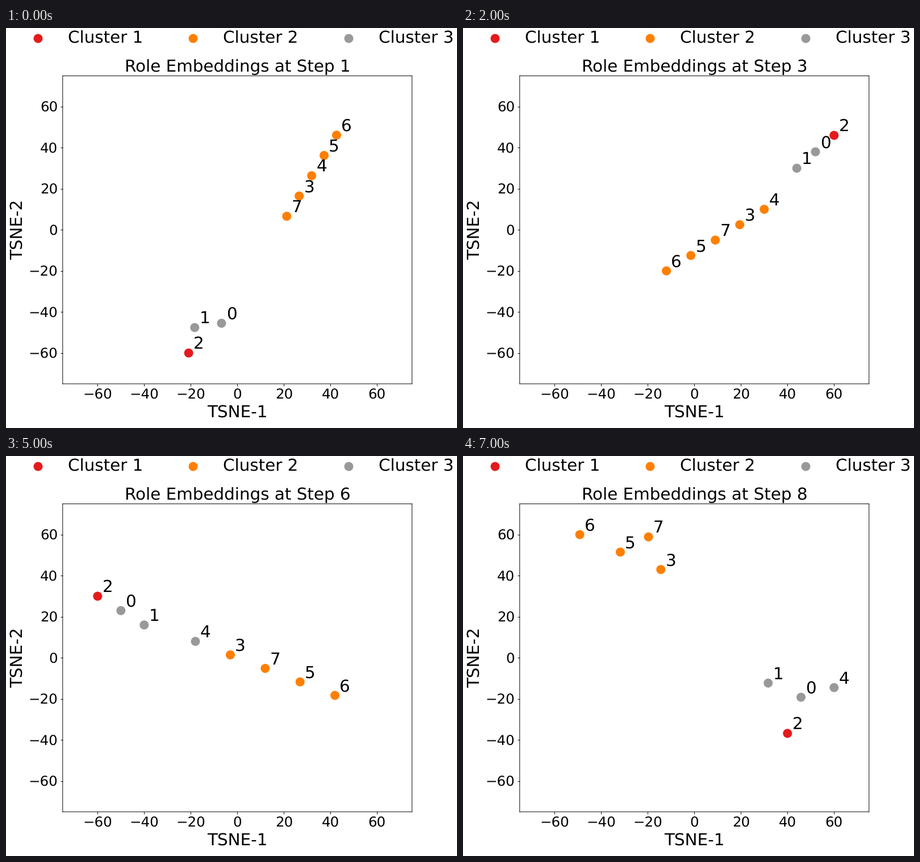
These frames come from a looping animation (794 px wide and 706 px high, 8000 ms). A matplotlib script:

```python
import matplotlib.pyplot as plt
import numpy as np
from matplotlib.animation import FuncAnimation

W, H = 794, 706
DPI = W / 9
LEFT, RIGHT, TOP, BOTTOM = 99.8, 714.8, 84.4, 628
RED, ORANGE, GREY = "#e41a1c", "#ff7f00", "#999999"
BIG, SMALL = 24, 20
DOT = dict(s=144, linewidths=1, snap=False)
TURN = 5  # agent 4 joins the grey cluster at this step index

# Each step strings its agents evenly along smooth curves,
# every curve given by the few key points it passes through.
STEPS = [
    {"201": [(-20.9, -60), (-6.8, -45.5), (-18.3, -47.6)],
     "73456": [(21.2, 6.6), (42.6, 46.1)]},
    {"201": [(49.9, 60), (33.1, 48), (49.9, 43.7)],
     "73": [(-27.4, -10.1), (-11.9, -20.4)],
     "564": [(17.8, -19.9), (27.2, -27.7), (33.4, -8.4)]},
    {"201": [(60, 46), (44, 30)],
     "43756": [(30, 10), (-12, -20)]},
    {"201": [(-3.9, 60), (15.2, 38)],
     "43756": [(-0.3, 2.3), (0.5, -22.4), (-18.2, -46.9)]},
    {"2014": [(60, 60), (24.6, 30.6)],
     "6573": [(-13, 15.6), (15.5, 15.3), (41, 8.3)]},
    {"201": [(-60, 30), (-40, 16)],
     "43756": [(-18, 8), (41.9, -18.3)]},
    {"201": [(14.4, 60), (16.7, 43.7), (29, 43.5)],
     "43756": [(7.1, 1.5), (3.5, -22.7), (-10.1, -46.8)]},
    {"2": [(40, -36.8)],
     "104": [(31.7, -12.3), (45.8, -19.2), (60, -14.5)],
     "653": [(-49.2, 60), (-14.4, 43)],
     "7": [(-19.7, 58.9)]},
]


def along(keys, count):
    """Evenly spaced points on the polynomial curve through the keys."""
    n = len(keys)
    coeffs = np.polyfit(np.linspace(0, 1, n), np.array(keys, float), n - 1)
    return np.vander(np.linspace(0, 1, count), n) @ coeffs


def positions(step):
    points = np.zeros((8, 2))
    for agents, keys in STEPS[step].items():
        points[[int(a) for a in agents]] = along(keys, len(agents))
    return points


def color(agent, step):
    if agent == 2:
        return RED
    return GREY if agent < 2 or (agent == 4 and step >= TURN) else ORANGE


def draw_legend(fig):
    """Legend row in pixel coordinates, y pointing down."""
    layer = fig.add_axes([0, 0, 1, 1])
    layer.set(xlim=(0, W), ylim=(H, 0))
    layer.axis("off")
    for i, fill in enumerate((RED, ORANGE, GREY)):
        x = 56 + 273.3 * i
        layer.scatter([x], [17.6], color=fill, **DOT)
        layer.text(x + 52.9, 25.5, f"Cluster {i + 1}", fontsize=BIG)


plt.rcParams.update({"font.family": "DejaVu Sans", "text.hinting": "none"})
fig = plt.figure(figsize=(W / DPI, H / DPI), dpi=DPI, facecolor="white")
ax = fig.add_axes([LEFT / W, 1 - BOTTOM / H,
                   (RIGHT - LEFT) / W, (BOTTOM - TOP) / H])
ticks = range(-60, 61, 20)
ax.set(xlim=(-75, 75), ylim=(-75, 75), xticks=ticks, yticks=ticks)
ax.tick_params(labelsize=SMALL)
ax.set_xlabel("TSNE-1", fontsize=BIG)
ax.set_ylabel("TSNE-2", fontsize=BIG)
for spine in ax.spines.values():
    spine.set_snap(False)
title = ax.set_title("Role Embeddings at Step 1", fontsize=BIG)
draw_legend(fig)

dots = ax.scatter(*positions(0).T, **DOT)
labels = [ax.text(0, 0, str(i), fontsize=BIG) for i in range(8)]


def update(step):
    points = positions(step)
    title.set_text(f"Role Embeddings at Step {step + 1}")
    dots.set_offsets(points)
    dots.set_color([color(agent, step) for agent in range(8)])
    for label, point in zip(labels, points):
        label.set_position(point + 2)
    return [title, dots, *labels]


anim = FuncAnimation(fig, update, frames=len(STEPS), interval=1000,
                     repeat=True, repeat_delay=0)
plt.show()
```
